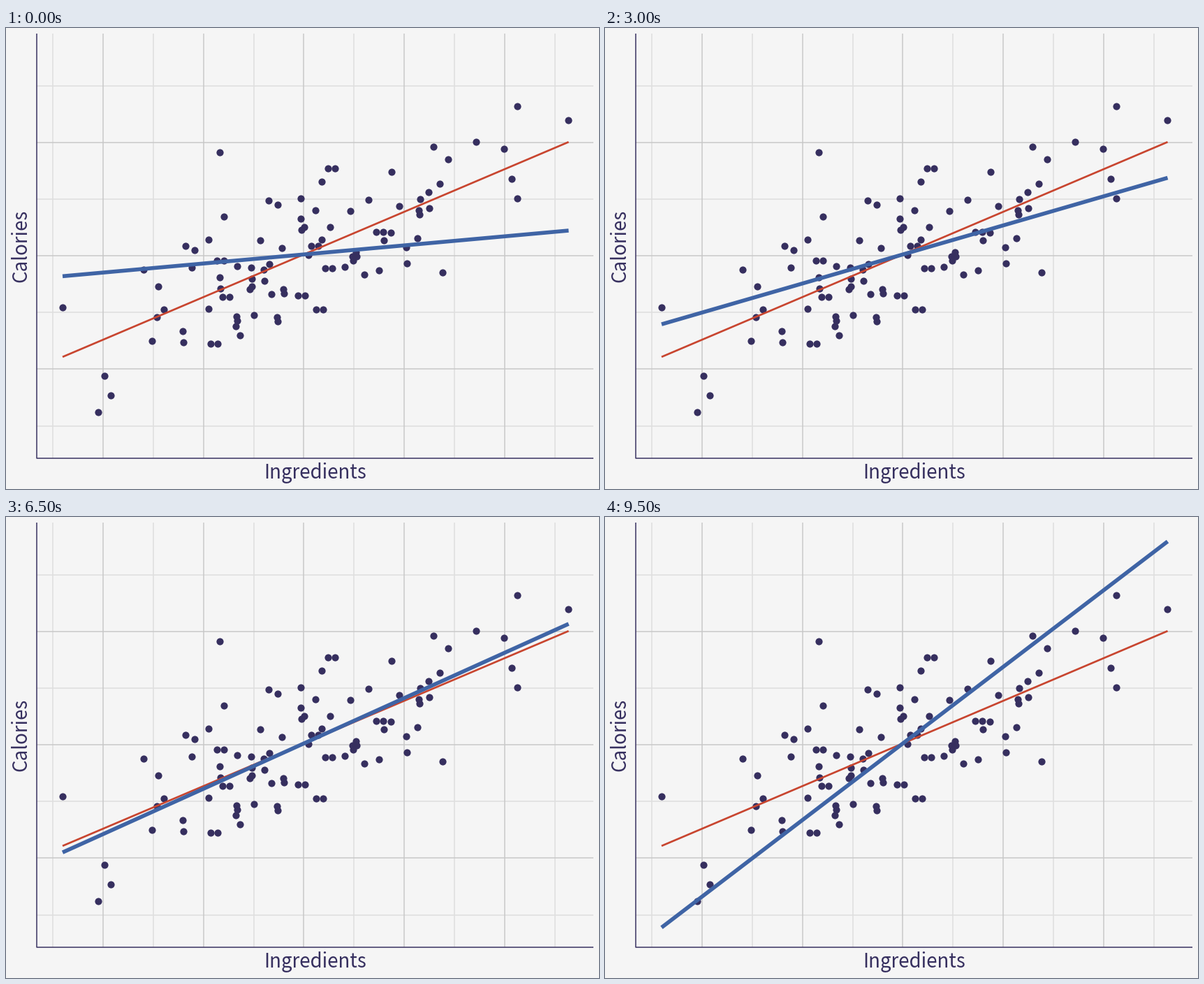
These frames come from a looping animation (849x660 px, 10 s). A matplotlib script:

```python
import matplotlib.pyplot as plt
from matplotlib.animation import FuncAnimation

WIDTH, HEIGHT, DPI = 849, 660, 64
PX = 72 / DPI  # points per pixel
BACKGROUND, INK = "#f5f5f5", "#362f5f"
RED, BLUE = "#c8452f", "#3f64a5"
MAJOR, MINOR = "#c8c8c8", "#dedede"
LEFT, RIGHT, TOP, BOTTOM = 44.5, 841.5, 7.5, 615.5
X_START, X_END = 81, 805.5
PIVOT_X, PIVOT_Y = 426.4, 324.2

SINGLES = [
    (81, 399.5), (132.5, 550.3), (209.5, 448), (266.5, 343), (290.5, 303.3),
    (290.5, 402), (312.5, 270.3), (305.7, 178), (331, 340.5), (335.5, 440),
    (349.3, 374), (364.5, 304), (422.5, 243.7), (427.5, 284.5), (451.7, 219.5),
    (534.5, 347), (552, 206), (563, 254.5), (588.7, 301), (593, 245.3),
    (621, 222.5), (612, 170.2), (633, 187.5), (625.3, 350.3), (673, 162.7),
    (713.5, 173), (732.4, 112.3), (805.5, 131.7),
]

# Points that come in twos, grouped by the step from one to the other.
PAIRS = {
    (10, 0): [(292.8, 452), (302.3, 332.5), (310.5, 385), (437.5, 311.5),
              (461.5, 201), (457, 343.7), (444, 402.7), (529.8, 292),
              (417.8, 382.8)],
    (1, 16): [(253, 434.2), (351, 342.8), (306, 357), (368.7, 346), (422.5, 273)],
    (1, 23): [(572.7, 313.7), (604.7, 234.7)],
    (1, 6): [(397, 373.5), (388, 413.5), (591.5, 260.8), (500.7, 321.2),
             (330, 413), (495.7, 327.2)],
    (13, 6): [(375.7, 247.2), (256.7, 312)],
    (8.5, 28): [(141.2, 497.5), (723.8, 216.2)],
    (21, 24): [(197.2, 346), (442.7, 261.2)],
    (10, -11): [(216.2, 414), (541.5, 304.3)],
    (18.5, -22.5): [(376.8, 337.8), (433.3, 325.3)],
    (28, 11): [(352, 370), (485.2, 342.3)],
    (26, -16): [(329, 427.2), (493.2, 261.5)],
}

# Height of the fitted line's right end at each step.
END_HEIGHTS = [290, 262, 242, 240, 237, 233, 214.5, 210, 208, 196,
               186, 175, 158, 153, 146, 145, 126, 102, 90, 35]


def all_points():
    points = list(SINGLES)
    for (dx, dy), starts in PAIRS.items():
        for x, y in starts:
            points += [(x, y), (x + dx, y + dy)]
    return points


def line_ends(y_end):
    """Heights of both ends of a line through the pivot."""
    ratio = (PIVOT_X - X_START) / (X_END - PIVOT_X)
    return PIVOT_Y + (PIVOT_Y - y_end) * ratio, y_end


fig = plt.figure(figsize=(WIDTH / DPI, HEIGHT / DPI), dpi=DPI, facecolor=BACKGROUND)
ax = fig.add_axes([0, 0, 1, 1])
ax.set(xlim=(0, WIDTH), ylim=(HEIGHT, 0))
ax.axis("off")


def stroke(xs, ys, color, width, order):
    return ax.plot(xs, ys, color=color, lw=width * PX, zorder=order,
                   solid_capstyle="butt")[0]


for color, x0, columns, y0, rows, order in (
        (MINOR, 67.2, 6, 82.6, 4, 1), (MAJOR, 139, 5, 163.8, 3, 2)):
    for i in range(columns):
        stroke([x0 + 143.7 * i] * 2, [TOP, BOTTOM], color, 1.5, order)
    for i in range(rows):
        stroke([LEFT, RIGHT], [y0 + 162.3 * i] * 2, color, 1.5, order)

stroke([LEFT, LEFT, RIGHT], [TOP, BOTTOM, BOTTOM], INK, 1.5, 3)
ax.scatter(*zip(*all_points()), s=(10.2 * PX) ** 2, color=INK, linewidths=0, zorder=4)
stroke([X_START, X_END], line_ends(163.2), RED, 2.7, 5)
fit = stroke([X_START, X_END], line_ends(END_HEIGHTS[0]), BLUE, 5.6, 6)

label = dict(family="Noto Sans CJK JP", size=27.6 * PX, color=INK,
             ha="center", va="baseline", rotation_mode="anchor")
ax.text(442.5, 645, "Ingredients", **label)
ax.text(29, 311.5, "Calories", rotation=90, **label)


def update(frame):
    fit.set_ydata(line_ends(END_HEIGHTS[frame]))
    return [fit]


animation = FuncAnimation(fig, update, frames=len(END_HEIGHTS), interval=500,
                          repeat=True, repeat_delay=0)
plt.show()
```
